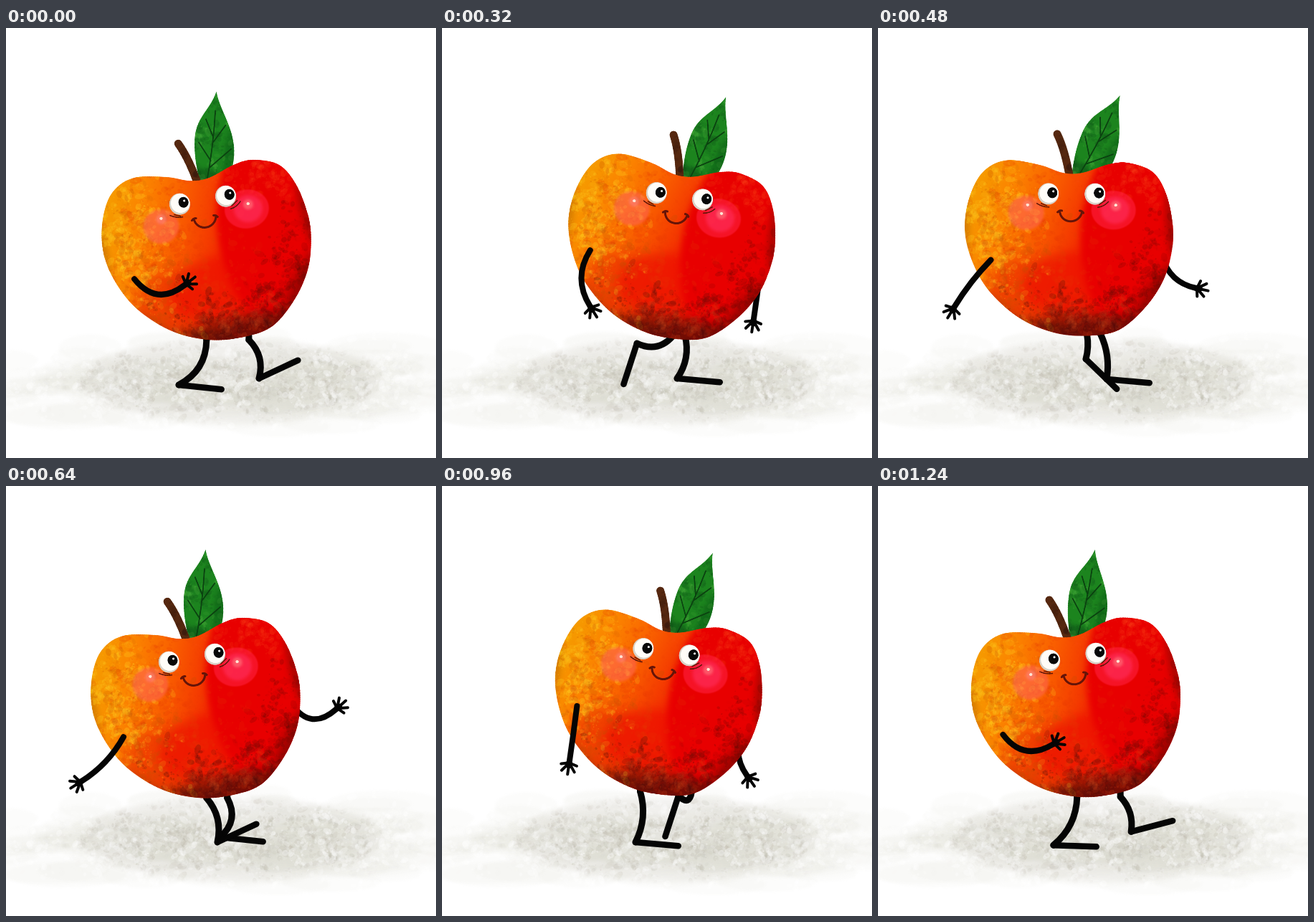
Write an HTML page with a canvas that moves like this. It is 600 by 600 pixels and loops after 1.28 s.

```html
<!DOCTYPE html>
<html lang="en">
<head>
<meta charset="utf-8">
<title>Walking apple</title>
<style>
html, body { margin: 0; width: 100%; height: 100%; overflow: hidden; background: #fff; }
canvas { display: block; width: 600px; height: 600px; }
</style>
</head>
<body>
<canvas id="stage" width="600" height="600"></canvas>
<script>
const LOOP = 1280, STEP = 40, TAU = Math.PI * 2, DEG = TAU / 360;
const INK = '#050505';
const { sin, cos } = Math;
const ctx = document.getElementById('stage').getContext('2d');

// One walk cycle of a leg in eight even phases; the other leg is half a cycle behind.
// hip from body centre, knee bend, heel x, heel y, foot angle in degrees
const GAIT = [
  [18, 11, 270, 494, 6], [8, 28, 271, 448, 61], [28, 10, 301, 436, 108], [47, 2, 319, 458, 44],
  [33, 8, 324, 493, -25], [31, 14, 313, 494, 6], [0, 7, 299, 493, 5], [22, 5, 290, 494, 5]];

const OUTLINE = [
  [-89, -123], [-42, -117], [-9, -106], [18, -106], [55, -118], [83, -120], [117, -107],
  [136, -75], [145, -30], [143, 5], [132, 43], [108, 80], [72, 112], [33, 121], [-17, 118],
  [-67, 98], [-108, 63], [-132, 25], [-145, -20], [-141, -65], [-122, -105]];

let seed = 7;
function random() {
  seed = (seed * 16807) % 2147483647;
  return seed / 2147483647;
}
const spread = size => (random() + random() + random() - 1.5) * size;

// Catmull-Rom interpolation around the walk cycle; phase runs from 0 to TAU.
function gaitAt(phase) {
  const n = GAIT.length, at = (phase / TAU + 1) % 1 * n, i = Math.floor(at), u = at - i;
  const row = k => GAIT[(i + k + n) % n];
  return row(0).map((a, c) => {
    const p = row(-1)[c], b = row(1)[c], q = row(2)[c];
    return a + u / 2 * (b - p + u * (2 * p - 5 * a + 4 * b - q + u * (3 * (a - b) + q - p)));
  });
}

function makeLayer(width, height, originX, originY, draw) {
  const canvas = document.createElement('canvas'), scale = 2;
  canvas.width = width * scale;
  canvas.height = height * scale;
  const g = canvas.getContext('2d');
  g.scale(scale, scale);
  g.translate(originX, originY);
  g.lineCap = g.lineJoin = 'round';
  draw(g);
  return () => ctx.drawImage(canvas, -originX, -originY, width, height);
}

function ellipse(g, x, y, rx, ry, fill, { blur = 0, alpha = 1, turn = 0 } = {}) {
  g.save();
  if (blur) g.filter = `blur(${blur}px)`;
  g.globalAlpha = alpha;
  g.fillStyle = fill;
  g.beginPath();
  g.ellipse(x, y, rx, ry, turn, 0, TAU);
  g.fill();
  g.restore();
}

function stroke(g, path, color, width) {
  g.strokeStyle = color;
  g.lineWidth = width;
  g.stroke(new Path2D(path));
}

// Clumps of dots around (x, y), only on what is already painted.
function speckle(g, count, x, y, w, h, color, alpha) {
  g.save();
  g.globalCompositeOperation = 'source-atop';
  for (let i = 0; i < count; i++) {
    const cx = x + spread(w), cy = y + spread(h);
    for (let k = 0; k < 5; k++) {
      const r = 0.5 + 4 * random() ** 3;
      ellipse(g, cx + spread(9), cy + spread(9), r * (1 + random()), r, color,
        { alpha: alpha * random(), turn: random() * TAU });
    }
  }
  g.restore();
}

function closedCurve(points) {
  const n = points.length, at = i => points[(i + n) % n];
  let d = `M${at(0)}`;
  for (let i = 0; i < n; i++) {
    const [p, a, b, q] = [at(i - 1), at(i), at(i + 1), at(i + 2)];
    d += `C${a.map((v, c) => v + (b[c] - p[c]) / 6)} ${b.map((v, c) => v - (q[c] - a[c]) / 6)} ${b}`;
  }
  return new Path2D(d + 'Z');
}

const drawGround = makeLayer(600, 600, 0, 0, g => {
  ellipse(g, 315, 492, 210, 58, '#f3f2f0', { blur: 8 });
  for (let i = 0; i < 150; i++) {
    ellipse(g, 325 + spread(270), 496 + spread(50), 30 + 60 * random(), 6 + 14 * random(),
      '#d5d1c8', { blur: 3, alpha: 0.08 });
  }
  speckle(g, 600, 325, 497, 330, 60, '#a8a292', 0.16);
  speckle(g, 500, 310, 500, 380, 65, '#fff', 0.35);
});

function drawFace(g) {
  ellipse(g, -60, -50, 25, 24, '#ff6560', { blur: 3, alpha: 0.5 });
  ellipse(g, 62, -54, 31, 27, '#ff2040', { blur: 1.5, alpha: 0.6 });
  ellipse(g, 64, -54, 20, 19, '#ff3060', { blur: 4, alpha: 0.6 });
  for (const x of [-58, 65]) {
    ellipse(g, x, -60, 7, 7, '#ff8a88', { blur: 3, alpha: 0.5 });
    ellipse(g, x, -61, 2.2, 2, '#ffe4d4', { blur: 0.5 });
  }
  for (const x of [-29, 36]) {
    ellipse(g, x, -76.5, 14.5, 15, '#d8d2c8');
    ellipse(g, x + 1, -77.5, 13.3, 13.5, '#fffdf8', { blur: 0.7 });
    ellipse(g, x + 5.5, -78, 7, 7.5, '#080808');
    ellipse(g, x + 7, -80, 1.5, 1.5, '#fff');
  }
  stroke(g, 'M-45-63Q-37-58-28-58M-39-63L-31-60M40-58Q49-59 55-66M42-62L51-68', '#5c1606', 1.4);
  stroke(g, 'M-13-51C-10-34 14-34 18-51M-16-51Q-13-54-10-53M15-53Q18-53 20-50', '#651408', 3);
}

const drawApple = makeLayer(320, 280, 160, 140, g => {
  g.save();
  g.clip(closedCurve(OUTLINE));
  const skin = g.createLinearGradient(-145, -50, 65, 25);
  ['#f59b00', '#fb8600', '#fa6800', '#f64600', '#f12400', '#ec0c00']
    .forEach((color, i) => skin.addColorStop(i / 5, color));
  g.fillStyle = skin;
  g.fillRect(-160, -140, 320, 280);
  ellipse(g, -50, 62, 65, 50, '#ee3600', { blur: 18, alpha: 0.75 });
  ellipse(g, 25, 55, 90, 52, '#ee1200', { blur: 14, alpha: 0.75 });
  ellipse(g, 112, -15, 96, 150, '#e80000', { blur: 9 });
  ellipse(g, 35, 120, 118, 27, '#5a0c04', { blur: 15, alpha: 0.8 });
  ellipse(g, 128, 72, 24, 75, '#780400', { blur: 16, alpha: 0.75, turn: 0.6 });
  ellipse(g, 146, -55, 12, 65, '#8a0800', { blur: 9, alpha: 0.6 });
  ellipse(g, -92, 95, 14, 65, '#8a3a00', { blur: 12, alpha: 0.5, turn: -0.9 });
  ellipse(g, -148, -20, 9, 80, '#a85600', { blur: 8, alpha: 0.4 });
  speckle(g, 260, -112, -35, 70, 130, '#ffc818', 0.35);
  speckle(g, 200, -105, 10, 85, 150, '#c04c00', 0.25);
  speckle(g, 300, -45, 10, 100, 150, '#e83400', 0.22);
  speckle(g, 260, 35, 95, 140, 45, '#4a0804', 0.25);
  speckle(g, 150, 118, 50, 50, 100, '#4c0400', 0.2);
  speckle(g, 120, 35, 108, 140, 30, '#c83c14', 0.22);
  speckle(g, 90, 95, -95, 80, 40, '#ff4a14', 0.18);
  g.restore();
  drawFace(g);
});

const drawLeaf = makeLayer(80, 150, 40, 130, g => {
  g.save();
  g.clip(new Path2D('M0-123C-7-95-25-85-24-54C-23-30-16-8-10 8L20 8C33-8 35-32 31-51C25-80 6-100 0-123Z'));
  g.fillStyle = '#1c841e';
  g.fillRect(-40, -130, 80, 150);
  ellipse(g, 28, -30, 9, 50, '#0d5f16', { blur: 6, alpha: 0.6 });
  ellipse(g, -6, -2, 25, 12, '#0d5016', { blur: 6, alpha: 0.6 });
  speckle(g, 110, 2, -50, 50, 110, '#0a5012', 0.3);
  speckle(g, 70, 2, -50, 50, 110, '#58b840', 0.25);
  stroke(g, 'M1-96Q3-45-2 6M-11-83L2-58M-18-50L1-26M17-77L2-52M28-45L0-16', '#0b4210', 1.8);
  g.restore();
});

const drawStem = makeLayer(60, 90, 40, 175, g => {
  stroke(g, 'M-17-160Q-6-138 1-98', '#562810', 11);
  speckle(g, 40, -8, -130, 22, 70, '#2c1006', 0.3);
});

// Limb from start to end whose middle is pushed sideways by `bend`.
function drawLimb(x, y, endX, endY, bend, width) {
  const length = Math.hypot(endX - x, endY - y) || 1;
  const cx = (x + endX) / 2 + 2 * bend * (endY - y) / length;
  const cy = (y + endY) / 2 - 2 * bend * (endX - x) / length;
  stroke(ctx, `M${x} ${y}Q${cx} ${cy} ${endX} ${endY}`, INK, width);
  return Math.atan2(endY - cy, endX - cx);
}

function drawArm([x, y], phase, scale) {
  const swing = (8 + 12.5 * cos(2 * phase - 0.3) + 63.5 * cos(phase - 0.06)) * DEG;
  const length = scale * (78 - 7 * cos(phase));
  const wristX = x + length * sin(swing), wristY = y + length * cos(swing);
  const angle = drawLimb(x, y, wristX, wristY, -6 - 13 * cos(phase - 0.5), 8);
  ctx.save();
  ctx.translate(wristX, wristY);
  ctx.rotate(angle);
  ellipse(ctx, 4, 0, 6, 5, INK);
  for (let i = -2; i <= 2; i++) {
    const turn = i * 0.58, reach = 18 - 1.5 * i * i;
    stroke(ctx, `M2 0L${reach * cos(turn)} ${reach * sin(turn)}`, INK, 4);
  }
  ctx.restore();
}

// side is 1 for the far leg and -1 for the near one.
function drawLeg(bodyX, bodyY, phase, side) {
  const [hip, bend, heelX, heelY, angle] = gaitAt(phase);
  const x = bodyX + hip + 22 * side, y = bodyY + 119;
  const footX = heelX + 29 * side, footY = heelY - 4 * side;
  stroke(ctx, `M${x} ${y - 10}V${y}`, INK, 9);
  drawLimb(x, y, footX, footY, bend, 9);
  stroke(ctx, `M${footX} ${footY}l${60 * cos(angle * DEG)} ${60 * sin(angle * DEG)}`, INK, 8.5);
}

function draw(t) {
  const phase = TAU * t / LOOP, opposite = phase + TAU / 2;
  const x = 292 + 22.8 * sin(2 * phase - 0.76) + 13 * cos(phase - 0.48) - 5.1 * cos(3 * phase - 0.68);
  const y = 314 + 7.7 * sin(2 * phase + 0.53) - 1.5 * sin(3 * phase) - 1.7 * cos(4 * phase);
  const tilt = (-0.7 - 9 * cos(2 * phase - 0.1)) * DEG;
  const onBody = (px, py) =>
    [x + px * cos(tilt) - py * sin(tilt), y + px * sin(tilt) + py * cos(tilt)];

  ctx.fillStyle = '#fff';
  ctx.fillRect(0, 0, 600, 600);
  ctx.lineCap = ctx.lineJoin = 'round';
  drawGround();
  drawLeg(x, y, opposite, 1);
  drawLeg(x, y, phase, -1);
  drawArm(onBody(130, 10), opposite, 0.88);

  ctx.save();
  ctx.translate(x, y);
  ctx.rotate(tilt);
  ctx.save();
  ctx.translate(16, -104);
  ctx.rotate((15 - 11.3 * sin(2 * phase)) * DEG);
  drawLeaf();
  ctx.restore();
  drawStem();
  drawApple();
  ctx.restore();

  drawArm(onBody(-109, 16), phase, 1);
}

const start = performance.now();
function tick() {
  const elapsed = performance.now() - start;
  draw(Math.floor(elapsed % LOOP / STEP) * STEP);
  requestAnimationFrame(tick);
}
tick();
</script>
</body>
</html>
```
